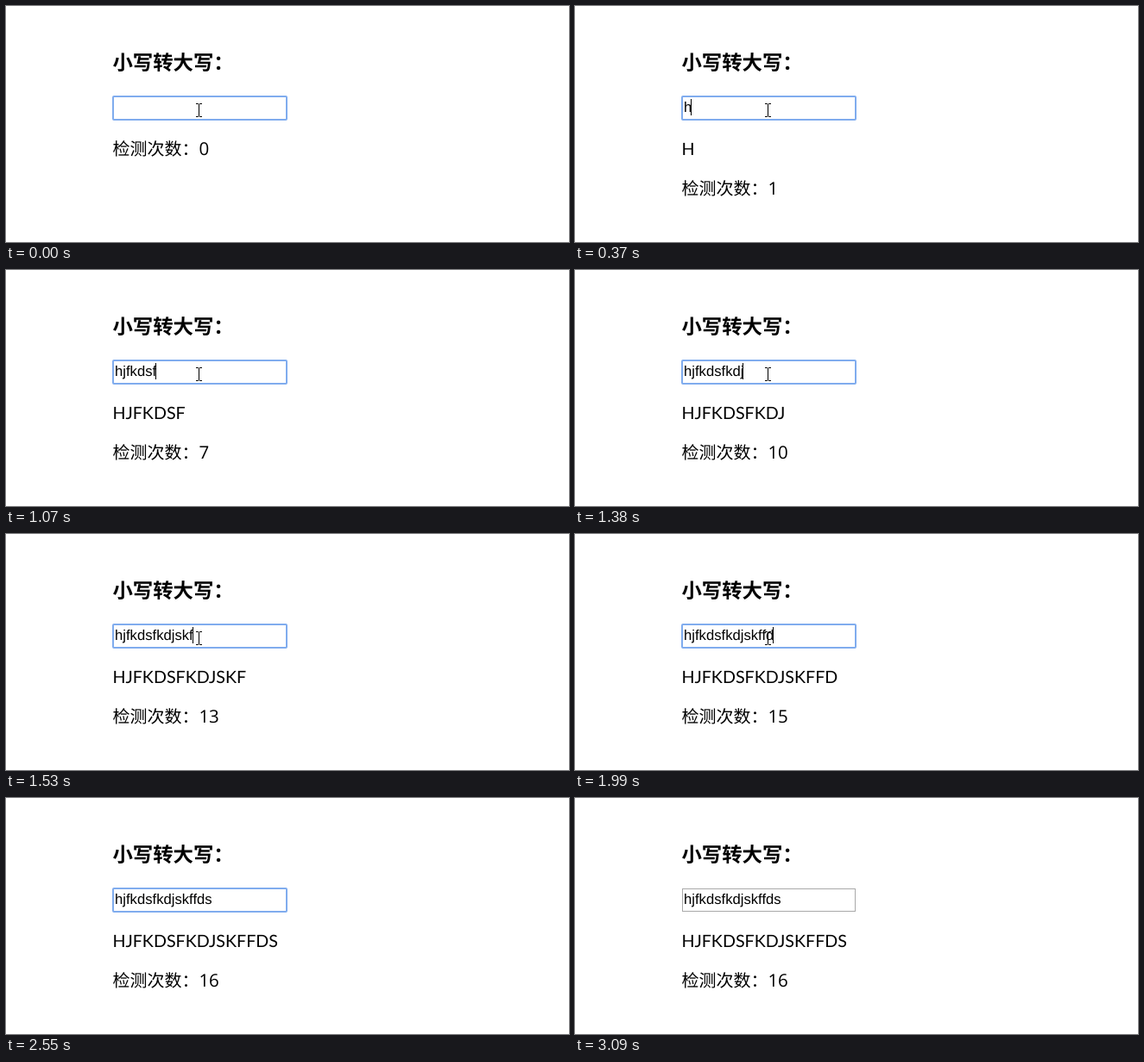
Animation of 652x274 px, one loop 3260 ms. Source, as an HTML page:

```html
<!DOCTYPE html>
<html lang="zh-CN">
<head>
<meta charset="utf-8">
<title>小写转大写</title>
<style>
  html, body { margin: 0; width: 100%; height: 100%; overflow: hidden; background: #fff; }
  svg { display: block; }
  text { font: 300 20px "Noto Sans CJK SC", "Noto Sans CJK", sans-serif; text-rendering: geometricPrecision; }
  .title { font-size: 23.4px; font-weight: bold; }
  #typed { font: 16.667px "Liberation Sans", Arial, sans-serif; }
  #upper { font: 19.7px Lato, sans-serif; }
  #count { font: 20.5px "Open Sans", "Noto Sans", sans-serif; }
</style>
</head>
<body>
<svg width="652" height="274" viewBox="0 0 652 274">
  <text class="title" x="123.4" y="74">小写转大写：</text>
  <rect id="idle" x="124.5" y="105.5" width="200" height="26" fill="none" stroke="#a9a9a9"/>
  <rect id="ring" x="124" y="105" width="201" height="27" rx="1" fill="none" stroke="#80acee" stroke-width="2"/>
  <text id="typed" x="126" y="123"></text>
  <rect id="caret" width="1" height="19"/>
  <text id="upper" x="123.4" y="173"></text>
  <text id="tally" x="123.4">检测次数：<tspan id="count"></tspan></text>
  <path id="beam" d="M220 113.5h3m1 0h3M223.5 114v14M220 128.5h3m1 0h3" fill="none" stroke="#000"/>
  <path id="arrow" transform="translate(369.5 229.5)" d="M0 0v16l3.7-3.5 2.6 5.8 2.3-1-2.5-5.6h5z" fill="#fff" stroke="#000"/>
</svg>
<script>
const LOOP = 3260;
const word = "hjfkdsfkdjskffds";
// [time in ms, letters typed so far]
const keys = [
  [0, 0], [370, 1], [610, 2], [840, 3], [920, 5], [990, 6], [1070, 7], [1150, 8],
  [1380, 10], [1450, 11], [1530, 13], [1760, 14], [1990, 15], [2070, 16]
];
const $ = id => document.getElementById(id);
const show = (id, on) => $(id).setAttribute("visibility", on ? "visible" : "hidden");

function draw(t) {
  const n = keys.filter(k => k[0] <= t).pop()[1];
  const text = word.slice(0, n);
  $("typed").textContent = text;
  $("upper").textContent = text.toUpperCase();
  $("count").textContent = n;
  $("tally").setAttribute("y", n ? 219 : 173);

  const end = n ? Math.floor(125.3 + $("typed").getComputedTextLength()) : 126;
  $("caret").setAttribute("x", end);
  $("caret").setAttribute("y", n ? 108 : 109);
  show("caret", t >= 70 && t < 2550);
  show("ring", t < 3090);
  show("idle", t >= 3090);
  show("beam", t < 2150);
  show("arrow", t >= 2150 && t < 2230);
}

const start = performance.now();
function tick() {
  draw((performance.now() - start) % LOOP);
  requestAnimationFrame(tick);
}
tick();
</script>
</body>
</html>
```
